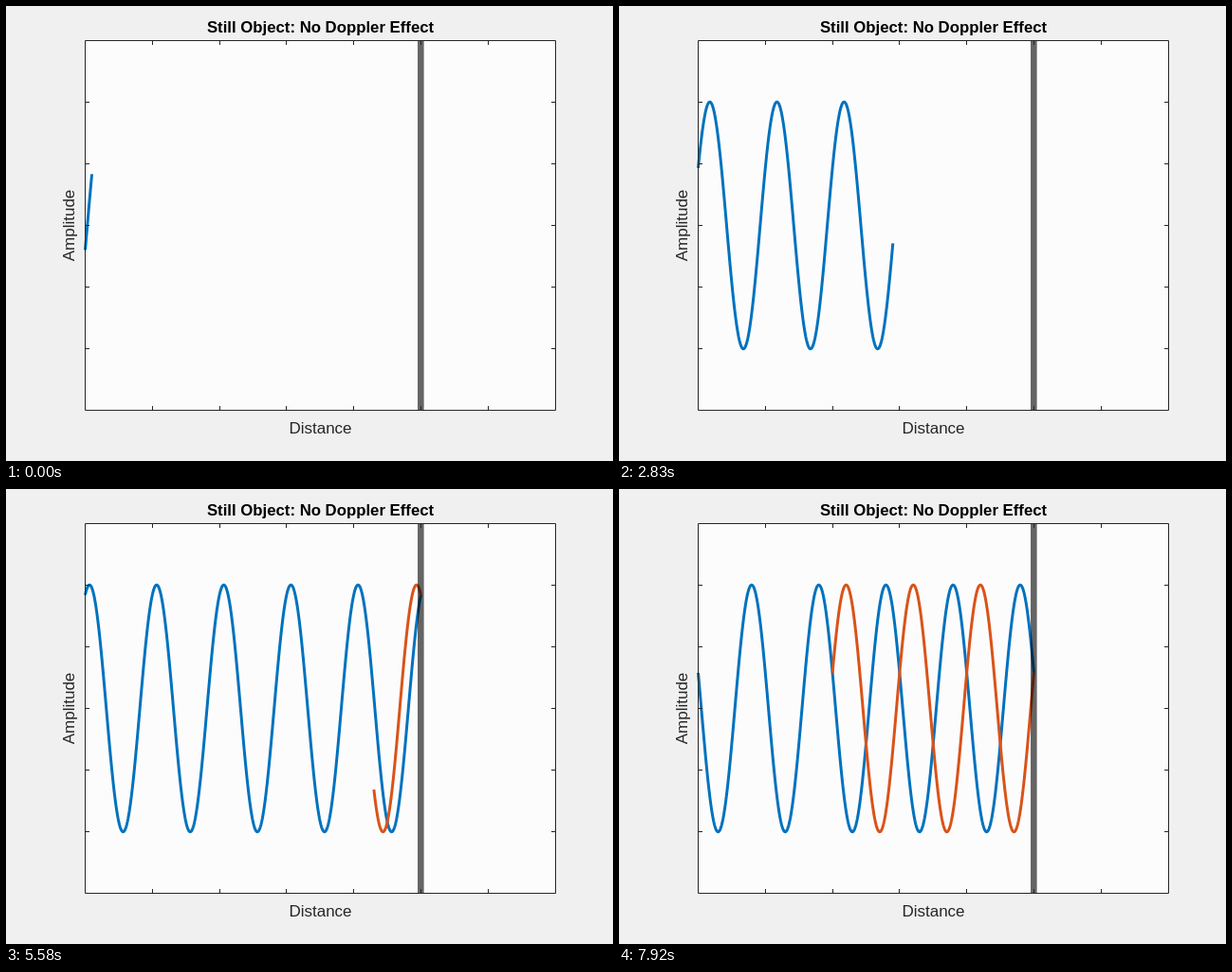
Write an HTML page with a canvas that moves like this. It is 640 px wide and 480 px high and loops after 8000 ms.

```html
<!DOCTYPE html>
<html lang="en">
<head>
<meta charset="utf-8">
<title>Wave reflection</title>
<style>
html, body { margin: 0; width: 100%; height: 100%; overflow: hidden; background: #f0f0f0; }
canvas { display: block; }
</style>
</head>
<body>
<canvas id="stage" width="640" height="480"></canvas>
<script>
const ctx = document.getElementById('stage').getContext('2d');
const LOOP = 8000, TICK = 1000 / 12;
const LEFT = 83.5, TOP = 36.1, WIDTH = 495.5, HEIGHT = 390.7;
const UNITS = 70, WAVELENGTH = 10, WALL = 50, PHASE_STEP = 0.2;
const INK = '#262626', FONT = '"Liberation Sans", Arial, sans-serif';

const px = x => LEFT + x * WIDTH / UNITS;
const py = y => TOP + HEIGHT / 2 - y * HEIGHT / 6;
const snap = v => Math.floor(v) + 0.5;

function line(x1, y1, x2, y2) {
  ctx.beginPath();
  ctx.moveTo(x1, y1);
  ctx.lineTo(x2, y2);
  ctx.stroke();
}

// Draws the wave between two travelled distances; past the wall it folds back.
function wave(from, to, phase, color) {
  const steps = Math.round((to - from) * 10);
  ctx.beginPath();
  for (let i = 0; i <= steps; i++) {
    const d = from + i / 10;
    const x = d > WALL ? 2 * WALL - d : d;
    ctx.lineTo(px(x), py(2 * Math.sin(2 * Math.PI * d / WAVELENGTH - phase)));
  }
  ctx.strokeStyle = color;
  ctx.lineWidth = 3;
  ctx.lineJoin = 'round';
  ctx.stroke();
}

function axes() {
  const left = snap(LEFT), right = snap(LEFT + WIDTH);
  const top = snap(TOP), bottom = snap(TOP + HEIGHT);
  const tickLength = 4.5;
  ctx.strokeStyle = INK;
  ctx.lineWidth = 1;
  ctx.strokeRect(left, top, right - left, bottom - top);
  for (let x = 10; x < UNITS; x += 10) {
    const sx = snap(px(x));
    line(sx, top, sx, top + tickLength);
    line(sx, bottom, sx, bottom - tickLength);
  }
  for (let y = -2; y <= 2; y++) {
    const sy = snap(py(y));
    line(left, sy, left + tickLength, sy);
    line(right, sy, right - tickLength, sy);
  }
}

function label(text, x, y, font, color, angle = 0) {
  ctx.save();
  ctx.translate(x, y);
  ctx.rotate(angle);
  ctx.font = font + ' ' + FONT;
  ctx.fillStyle = color;
  ctx.textAlign = 'center';
  ctx.fillText(text, 0, 0);
  ctx.restore();
}

function draw(time) {
  // The wave advances ten times a second, shown on a twelve-per-second clock.
  const tick = Math.floor((time % LOOP + 4) / TICK) % 96;
  const step = Math.ceil(tick * 5 / 6 - 0.5) + 1;
  const phase = step * PHASE_STEP;

  ctx.fillStyle = '#f0f0f0';
  ctx.fillRect(0, 0, 640, 480);
  ctx.fillStyle = '#fcfcfd';
  ctx.fillRect(LEFT, TOP, WIDTH, HEIGHT);

  wave(0, Math.min(step, WALL), phase, '#0072bd');
  if (step > WALL) wave(WALL, step, phase, '#d95319');

  ctx.fillStyle = 'rgba(0, 0, 0, 0.6)';
  ctx.fillRect(px(WALL) - 3.4, TOP, 6.6, HEIGHT);

  axes();
  label('Still Object: No Doppler Effect', 331.5, 28, 'bold 16.75px', '#000');
  label('Distance', 331.5, 451, '17px', INK);
  label('Amplitude', 72, 231.5, '17px', INK, -Math.PI / 2);
}

const start = performance.now();
function loop() {
  draw(performance.now() - start);
  requestAnimationFrame(loop);
}
loop();
</script>
</body>
</html>
```
